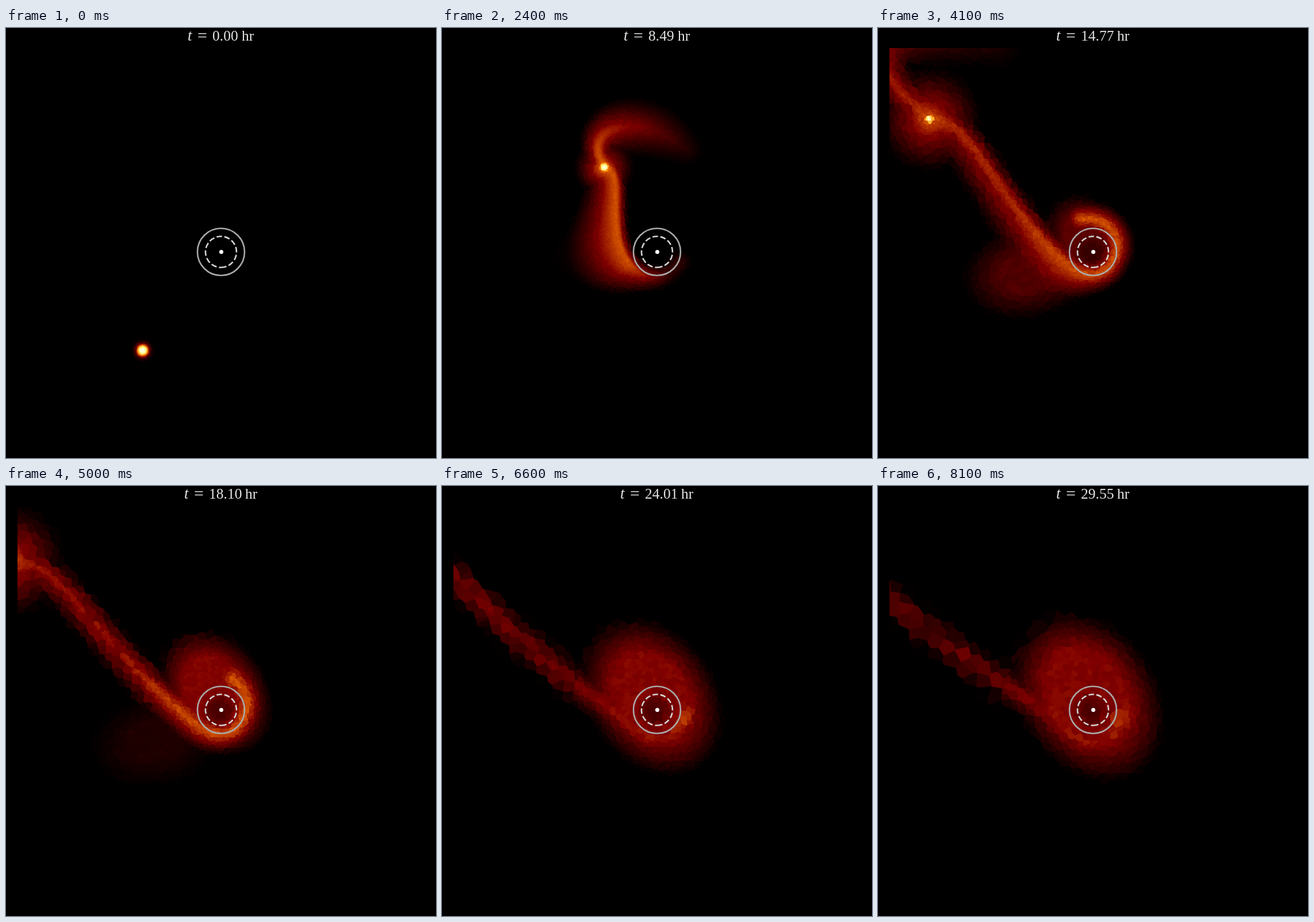
Animation, 748 px wide and 748 px high, one loop 8.2 s. Source, as an HTML page with a canvas:

```html
<!DOCTYPE html>
<html lang="en">
<head>
<meta charset="utf-8">
<title>Tidal disruption</title>
<style>
html, body { margin: 0; width: 100%; height: 100%; overflow: hidden; background: #000; }
canvas { display: block; width: 748px; height: 748px; }
</style>
</head>
<body>
<canvas id="stage" width="748" height="748"></canvas>
<script>
const ctx = document.getElementById('stage').getContext('2d');
const SIZE = 748, LEFT = 20, TOP = 35;
const HOLE = { x: 374, y: 389.5 };
const LOOP = 8200, STEP = 100, HOURS = 0.36932;
const PERI = 41, PERI_STEP = 13.24, PACE = 2.6;
const DEG = Math.PI / 180;
const FONT = '"Liberation Serif", "Noto Serif", serif';

// Goes from p to q while k goes from a to b, and holds outside
function ramp(k, a, b, p, q) {
  return p + (q - p) * Math.max(0, Math.min(1, (k - a) / (b - a)));
}

function bell(x, mid, width) {
  return Math.exp(-(((x - mid) / width) ** 2));
}

function polar(angle, r) {
  return [HOLE.x + r * Math.cos(angle), HOLE.y + r * Math.sin(angle)];
}

// Parabolic orbit around the hole (closed solution of Barker's equation)
function starAt(k) {
  const d = 2 * Math.sinh(Math.asinh(1.5 * (k - PERI_STEP) / PACE) / 3);
  const angle = -2 * Math.atan(d), r = PERI * (1 + d * d), [x, y] = polar(angle, r);
  return { angle, r, x, y };
}

const streamGlow = k => ramp(k, 5, 15, 0.1, 1) * 0.42 * Math.exp(-Math.max(0, k - 20) / 72);
const streamWidth = k => ramp(k, 13, 45, 14, 32);

// Both arms return points: x, y, brightness and the widths of the two sides.
// The bound arm runs ahead of the star, falls to the hole and winds around it.
function boundArm(k, star) {
  const length = Math.max(0, ramp(k, 5, 15, 0, 80) + ramp(k, 15, 30, 0, 250) - ramp(k, 40, 65, 0, 125));
  const bend = 25 * (Math.max(2, k - 13) / 10) ** -0.85;
  const inner = ramp(k, 40, 80, 36, 56);
  const glow = streamGlow(k), hot = ramp(k, 5, 15, 0.1, 1) * ramp(k, 49, 65, 0.4, 0.24);
  const floor = ramp(k, 23, 33, 0.25, 1), fan = 110 * bell(k, 30, 12), width = streamWidth(k);
  const path = [], N = 44;
  for (let i = 0; i <= N; i++) {
    const s = (i / N) ** 2.5, phi = length * s;
    const x = Math.exp(-((phi / bend) ** 0.65));
    const r = inner + (star.r - inner) * x + 0.2 * Math.max(0, phi - 200);
    const lag = 6 * x * (1 - x ** 8);
    const mix = Math.min(1, 2.5 * x);
    const fade = Math.max(floor, Math.min(1, 1.6 * (1 - s)));
    path.push([...polar(star.angle - (phi - lag) * DEG, r), fade * (hot + (glow - hot) * mix),
      width + fan * bell(phi, 50, 50), width * 0.9]);
  }
  return path;
}

// The unbound arm trails behind on the far side.
function unboundArm(k, star) {
  const length = Math.min(7.4 * Math.max(0, k - 5), 74 * Math.exp((15 - k) / 28));
  const lift = ramp(k, 15, 33, 0.25, 0.37), spread = ramp(k, 15, 23, 5, 30);
  const path = [], N = 22;
  for (let i = 0; i <= N; i++) {
    const s = i / N, r = star.r * (1 + lift * Math.sin(Math.PI * s ** 0.6));
    const width = streamWidth(k) + spread * Math.sin(Math.PI * s);
    path.push([...polar(star.angle + length * s ** 1.3 * DEG, length ? r : star.r),
      streamGlow(k) * (1 - s) ** 0.8, width, width]);
  }
  return path;
}

function armValue(path, x, y) {
  let best = 1e9, bi = 0, bt = 0, side = 3;
  for (let i = 0; i + 1 < path.length; i++) {
    const a = path[i], b = path[i + 1];
    const dx = b[0] - a[0], dy = b[1] - a[1], px = x - a[0], py = y - a[1];
    const t = Math.max(0, Math.min(1, (px * dx + py * dy) / (dx * dx + dy * dy || 1)));
    const ex = px - t * dx, ey = py - t * dy, d2 = ex * ex + ey * ey;
    if (d2 < best) {
      best = d2; bi = i; bt = t;
      side = dx * py - dy * px > 0 ? 3 : 4;
    }
  }
  const a = path[bi], b = path[bi + 1], mix = n => a[n] + (b[n] - a[n]) * bt;
  const u = (Math.sqrt(best + 16) - 4) / mix(side);
  return u < 1 ? mix(2) * (1 - u) ** 1.2 : 0;
}

function cloud(x, y, rx, ry, tilt, glow, soft) {
  const c = Math.cos(tilt), s = Math.sin(tilt);
  const value = (px, py) => {
    const dx = px - x, dy = py - y;
    const u = Math.hypot((dx * c + dy * s) / rx, (dy * c - dx * s) / ry);
    return u < 1 ? glow * Math.min(1, (1 - u) * soft) : 0;
  };
  return { x, y, r: glow > 0.01 ? Math.max(rx, ry) : 0, value };
}

function makeScene(k) {
  const star = starAt(k);
  const peak = ramp(k, 33, 65, 0.95, 0.5), core = ramp(k, 0, 15, 10.5, 8.5);
  const halo = ramp(k, 13, 33, 21, 86) + ramp(k, 33, 49, 0, 14), glow = ramp(k, 0, 23, 0.3, 0.4);
  const arms = [boundArm(k, star), unboundArm(k, star)];
  const reach = 170 * (1 - Math.exp(-Math.max(0.1, k - 27) / 18));
  const disk = cloud(364, ramp(k, 33, 49, 377, 358) + ramp(k, 49, 65, 0, 8), reach, reach * 0.75, 0.96,
    ramp(k, 27, 45, 0, 0.25), 2.2);
  const fanSize = ramp(k, 20, 33, 60, 115);
  const fan = cloud(260, ramp(k, 23, 55, 390, 455), fanSize, fanSize * 0.7, -0.2, 0.16 * bell(k, 38, 11), 1.7);
  const spot = cloud(419, 406, 50, 25, -0.95, ramp(k, 50, 65, 0, 0.32), 1.3);

  const box = [SIZE, SIZE, 0, 0];
  const grow = (x, y, r) => {
    box[0] = Math.min(box[0], x - r); box[1] = Math.min(box[1], y - r);
    box[2] = Math.max(box[2], x + r); box[3] = Math.max(box[3], y + r);
  };
  grow(star.x, star.y, halo);
  arms.forEach(arm => arm.forEach(p => grow(p[0], p[1], Math.max(p[3], p[4]))));
  [disk, fan, spot].forEach(c => { if (c.r) grow(c.x, c.y, c.r); });

  function field(x, y) {
    const r = Math.hypot(x - star.x, y - star.y);
    const near = Math.hypot(x - HOLE.x + 4, y - HOLE.y - 1) / 25;
    const parts = [
      peak * Math.exp(-((r / core) ** 2.5)),
      r < halo ? glow * (1 - r / halo) ** 1.2 : 0,
      armValue(arms[0], x, y),
      armValue(arms[1], x, y),
      disk.value(x, y) * (1 - 0.42 * Math.exp(-(near ** 4))),
      fan.value(x, y),
      spot.value(x, y)
    ];
    return parts.reduce((sum, v) => sum + v ** 5, 0) ** 0.2;
  }
  return { field, box, reach };
}

// Seeded jitter for the cell mosaic
const CELLS = 256;
let seed = 7;
function rand() {
  seed = (Math.imul(seed, 1664525) + 1013904223) >>> 0;
  return seed / 4294967296;
}
const jitter = Float32Array.from({ length: CELLS * CELLS * 3 }, rand);

function mosaic(size, noise, field) {
  const span = Math.ceil(SIZE / size) + 8, mid = span >> 1;
  const cache = new Float32Array(span * span * 2).fill(-1);
  return (x, y) => {
    const gx = (x - HOLE.x) / size, gy = (y - HOLE.y) / size;
    const ci = Math.floor(gx), cj = Math.floor(gy);
    let best = 9, bi = 0, bj = 0, bn = 0;
    for (let j = cj - 1; j <= cj + 1; j++) {
      for (let i = ci - 1; i <= ci + 1; i++) {
        const n = ((j & 255) * CELLS + (i & 255)) * 3;
        const dx = i + jitter[n] - gx, dy = j + jitter[n + 1] - gy, d = dx * dx + dy * dy;
        if (d < best) { best = d; bi = i; bj = j; bn = n; }
      }
    }
    const slot = (bj + mid) * span + bi + mid;
    if (cache[slot] < 0) {
      const v = field(HOLE.x + (bi + jitter[bn]) * size, HOLE.y + (bj + jitter[bn + 1]) * size);
      cache[slot] = v * (1 + noise * (jitter[bn + 2] - 0.5));
    }
    return cache[slot];
  };
}

function drawGas(k) {
  const { field, box, reach } = makeScene(k);
  const size = ramp(k, 15, 80, 3, 20), noise = ramp(k, 15, 65, 0.1, 0.28);
  const x0 = Math.max(LEFT, Math.floor(box[0])), y0 = Math.max(TOP, Math.floor(box[1]));
  const w = Math.min(SIZE - LEFT, Math.ceil(box[2])) - x0, h = Math.min(SIZE, Math.ceil(box[3])) - y0;
  if (w <= 0 || h <= 0) return;
  const coarse = mosaic(size, noise, field), fine = mosaic(size / 2, noise * 0.6, field);
  const img = ctx.createImageData(w, h), px = img.data;
  for (let y = y0, n = 0; y < y0 + h; y++) {
    for (let x = x0; x < x0 + w; x++, n += 4) {
      let v = coarse(x, y);
      if (v > 0.24 || Math.hypot(x - HOLE.x, y - HOLE.y) < reach) v = fine(x, y);
      px[n] = 510 * v;
      px[n + 1] = 510 * v - 127.5;
      px[n + 2] = 510 * v - 255;
      px[n + 3] = 255;
    }
  }
  ctx.putImageData(img, x0, y0);
}

function ring(r, color, dash) {
  ctx.strokeStyle = color;
  ctx.lineWidth = 2.6;
  ctx.setLineDash(dash);
  ctx.beginPath();
  ctx.arc(HOLE.x, HOLE.y, r, Math.PI / 2, -1.5 * Math.PI, true);
  ctx.stroke();
}

function write(text, x, y, style) {
  ctx.font = style + ' ' + FONT;
  ctx.fillText(text, x, y);
}

function drawClock(k) {
  const value = (k * HOURS).toFixed(2), shift = value.length > 4 ? 6 : 0;
  ctx.fillStyle = '#e4e4e4';
  write('t', 316 - shift, 22, 'italic 27px');
  write('=', 333 - shift, 22.5, '30px');
  write(value, 359 - shift, 22, '25.5px');
  write('hr', 410 + shift, 22, '25.5px');
}

function draw(k) {
  ctx.fillStyle = '#000';
  ctx.fillRect(0, 0, SIZE, SIZE);
  drawGas(k);
  ring(41, '#a9a9a9', []);
  ring(27, '#d3d3d3', [9.62, 4.16]);
  ctx.fillStyle = '#fff';
  ctx.beginPath();
  ctx.arc(374.5, HOLE.y, 3.5, 0, 2 * Math.PI);
  ctx.fill();
  drawClock(k);
}

const start = performance.now();
let shown = -1;
function tick() {
  const time = (performance.now() - start) % LOOP;
  const k = Math.max(0, Math.floor(time / STEP) - 1);
  if (k !== shown) {
    shown = k;
    draw(k);
  }
  requestAnimationFrame(tick);
}
tick();
</script>
</body>
</html>
```
